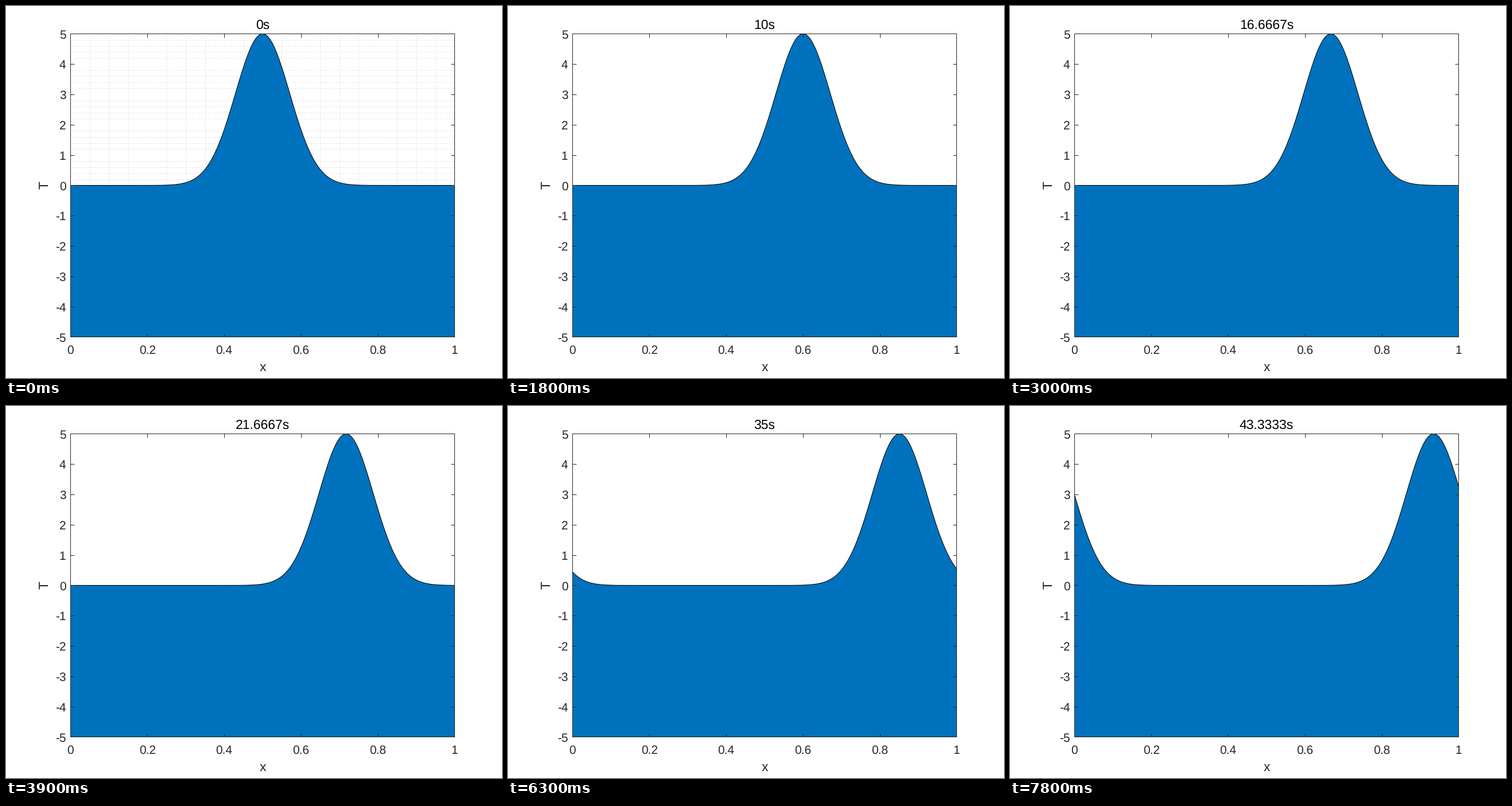
Animation, 864 px wide and 648 px high, one loop 8 s. Source, as a matplotlib script:

```python
import matplotlib.pyplot as plt
import numpy as np
from matplotlib.animation import FuncAnimation

WIDTH, HEIGHT, DPI = 864, 648, 150
LEFT, RIGHT, BOTTOM, TOP = 112.49, 781.49, 71.55, 599.55   # axes box, pixels from lower left
PX = 72 / DPI                                              # one pixel in points
INTERVAL, FRAMES, FRAMES_PER_STEP = 100, 80, 3
STEP_SECONDS = 5 / 3
CELL = 1 / 299                                             # spacing of the 300 point grid
CELLS_PER_STEP = 5
PERIOD = 1 + 2 * CELL
INK = (0.15, 0.15, 0.15)

plt.rcParams["font.family"] = "Liberation Sans"
plt.rcParams["text.hinting"] = "none"

fig = plt.figure(figsize=(WIDTH / DPI, HEIGHT / DPI), dpi=DPI, facecolor="white")
ax = fig.add_axes([LEFT / WIDTH, BOTTOM / HEIGHT,
                   (RIGHT - LEFT) / WIDTH, (TOP - BOTTOM) / HEIGHT])
ax.set(xlim=(0, 1), ylim=(-5, 5))
ax.set_axisbelow(False)


def label(x, y, text, size=10, color=INK, ha="center", **kwargs):
    """Put text with its baseline at pixel (x, y), measured from the top left."""
    return fig.text(x / WIDTH, 1 - y / HEIGHT, text, fontsize=size,
                    color=color, ha=ha, va="baseline", **kwargs)


def draw_frame():
    x_ticks = np.arange(6) / 5
    y_ticks = np.arange(-5, 6)
    ax.set_xticks(x_ticks)
    ax.set_yticks(y_ticks)
    ax.tick_params(direction="in", length=6.5 * PX, width=PX, color=INK,
                   top=True, right=True, labelbottom=False, labelleft=False)
    for spine in ax.spines.values():
        spine.set(linewidth=PX, edgecolor=INK)
    for x in x_ticks:
        label(LEFT + x * (RIGHT - LEFT), 606, f"{x:g}")
    for y in y_ticks:
        row = HEIGHT - BOTTOM - (y + 5) / 10 * (TOP - BOTTOM)
        label(104.5, row + 8, f"{y}", ha="right")
    label(447, 636, "x", size=11)
    fig.text(78.5 / WIDTH, 1 - 312 / HEIGHT, "T", fontsize=11, color=INK,
             rotation=90, ha="right", va="center")


def minor_grid():
    style = dict(color=(0.1, 0.1, 0.1), alpha=0.25, linewidth=PX,
                 linestyle=(0.5, (1, 3)), dash_capstyle="butt", zorder=0.5)
    columns = [ax.axvline(i / 20, **style) for i in range(1, 20) if i % 4]
    rows = [ax.axhline(i / 5, **style) for i in range(-24, 25) if i % 5]
    return columns + rows


def profile(x, step):
    offset = x - 0.5 - step * CELLS_PER_STEP * CELL
    offset = (offset + PERIOD / 2) % PERIOD - PERIOD / 2
    return 5 * np.exp(-100 * offset ** 2)


draw_frame()
grid = minor_grid()
xs = np.linspace(0, 1, 300)
area, = ax.fill([0, 1, 1], [0, 0, 1], facecolor="#0072BD", edgecolor="black",
                linewidth=0.5, zorder=1)
title = label(447, 40, "", size=11, color="black")


def update(frame):
    step = frame // FRAMES_PER_STEP
    curve = np.column_stack([xs, profile(xs, step)])
    area.set_xy(np.vstack([[0, -5], curve, [1, -5]]))
    title.set_text(f"{round(step * STEP_SECONDS, 4):g}s")
    for line in grid:
        line.set_visible(step == 0)
    return [area, title, *grid]


anim = FuncAnimation(fig, update, frames=FRAMES, interval=INTERVAL,
                     repeat=True, repeat_delay=0, blit=False)
plt.show()
```
